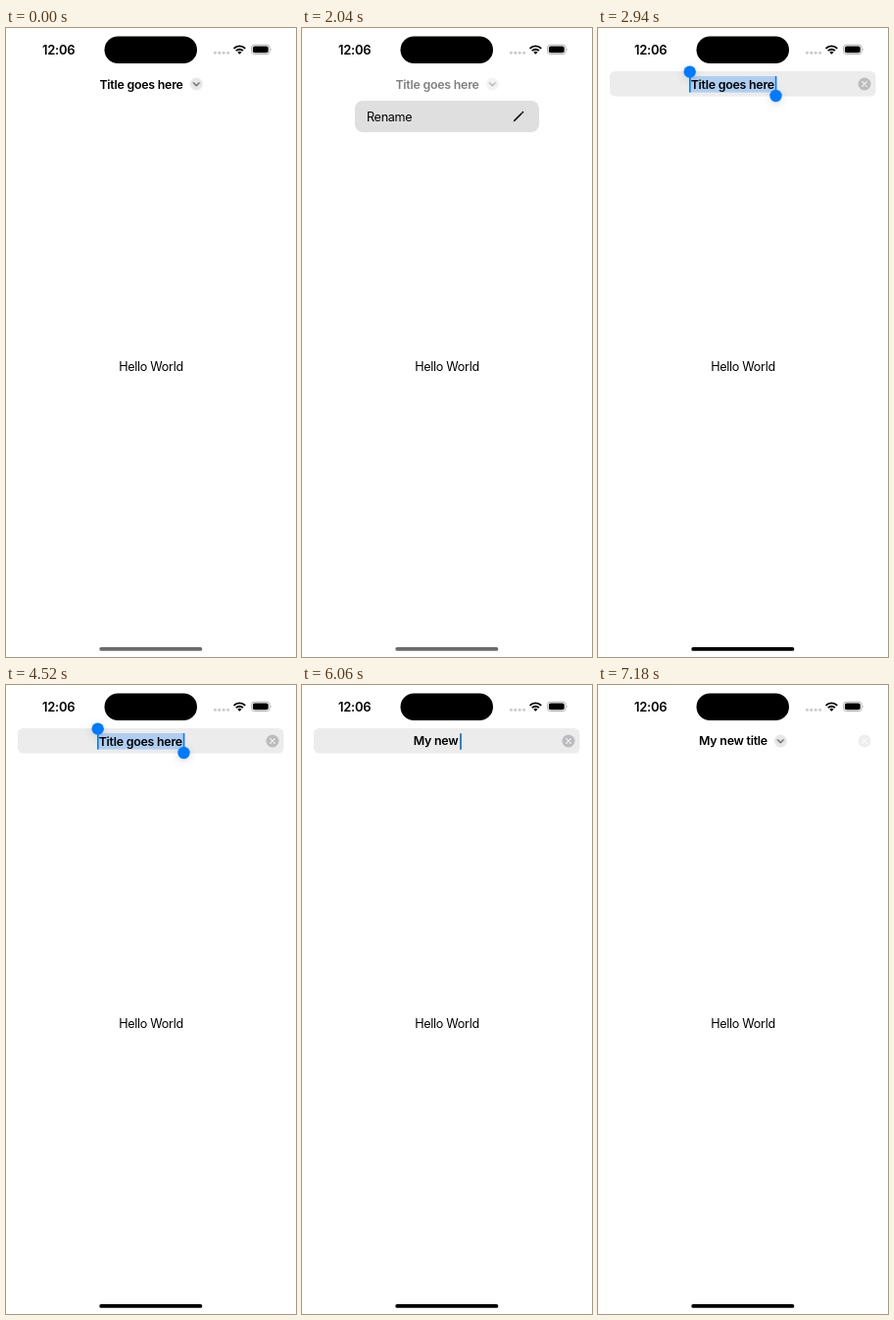
Recreate the animation shown at these times as an HTML page. Size 296x640 px, loop 8000 ms.

```html
<!DOCTYPE html>
<html lang="en">
<head>
<meta charset="utf-8">
<title>Rename title</title>
<style>
html, body { margin: 0; width: 100%; height: 100%; overflow: hidden; background: #fff; }
body { position: relative; font-family: Inter, Roboto, sans-serif; color: #000; }
svg { position: absolute; left: 0; top: 0; display: block; }
text, .menu { font-size: 12.6px; letter-spacing: -.024em; }
.bold { font-weight: 600; font-size: 12.4px; letter-spacing: -.02em; }

/* every timed part shares one stepped 8 s loop */
.menu, .menu i, .title, .chev, .chev2, .field, .select, .stray, .clear, .typed, .caret, .home {
  animation: 8s step-end infinite;
}

.menu {
  position: absolute; left: 54px; top: 74px; width: 188px; height: 32px;
  transform-origin: 50% -17px; animation-name: menu;
}
.menu i {
  position: absolute; inset: 0; border-radius: 8px; animation-name: panel;
}
.menu span { position: absolute; left: 12px; top: 0; line-height: 33px; }
.menu svg { left: 161px; top: 10px; }
@keyframes menu {
  0%      { opacity: 0; transform: scale(.2); }
  6.25%   { opacity: .2; transform: scale(.35); }
  7.625%  { opacity: .6; transform: scale(.7); }
  9%      { opacity: .9; transform: scale(.95); }
  10.375% { opacity: 1; transform: scale(1.02); }
  11.875% { opacity: 1; transform: none; }
  26.875% { opacity: .65; transform: scale(.85); }
  28.25%  { opacity: .2; transform: scale(.45); }
  29.625%, 100% { opacity: 0; transform: scale(.2); }
}
@keyframes panel {
  0%    { background: #f1f1f1; box-shadow: 0 4px 44px 12px rgba(0, 0, 0, .15); }
  25.5%, 100% { background: #dfdfdf; box-shadow: none; }
}

.title { animation-name: title; }
@keyframes title {
  0%      { opacity: 1; transform: none; }
  6.25%   { opacity: .5; transform: none; }
  28.25%  { opacity: .75; transform: none; }
  29.625% { opacity: 1; transform: translateX(-.7px); }
  58.25%, 100% { opacity: 0; }
}

.chev { animation-name: chev; }
@keyframes chev {
  0% { opacity: 1; }
  6.25% { opacity: .5; }
  28.25%, 100% { opacity: 0; }
}
.chev2 { animation-name: chev2; }
@keyframes chev2 {
  0% { opacity: 0; }
  88.25% { opacity: .4; }
  89.75%, 100% { opacity: 1; }
}

.field { animation-name: field; }
@keyframes field {
  0% { opacity: 0; }
  28.25% { opacity: .5; }
  29.625% { opacity: 1; }
  88.25% { opacity: .5; }
  89.75%, 100% { opacity: 0; }
}
.clear { animation-name: clear; }
@keyframes clear {
  0% { opacity: 0; }
  36.75% { opacity: 1; }
  88.25% { opacity: .6; }
  89.75%, 100% { opacity: .25; }
}

.stray { animation-name: stray; }
@keyframes stray {
  0%, 32.5%, 100% { visibility: hidden; }
  29.625% { visibility: visible; }
}
.select { animation-name: select; }
@keyframes select {
  0%, 58.25%, 100% { visibility: hidden; }
  32.5% { visibility: visible; }
}
.knob { fill: #007aff; filter: drop-shadow(0 2px 4px rgba(0, 0, 0, .14)); }

.home { animation-name: home; }
@keyframes home {
  0% { fill: #6a6a6a; }
  32.5%, 100% { fill: #000; }
}

.typed {
  position: absolute; left: 38px; top: 45px; width: 200px; height: 24px;
  font: 600 0/24px Inter, Roboto, sans-serif; text-align: center; white-space: pre;
  animation-name: typed;
}
@keyframes typed {
  0% { visibility: hidden; }
  58.25%, 100% { visibility: visible; }
}
.typed b {
  font-weight: 600; font-size: 0; letter-spacing: -.02em;
  animation: key 8s var(--at) step-end infinite;
}
@keyframes key {
  0% { font-size: 12.4px; }
  50%, 100% { font-size: 0; }
}
.caret {
  display: inline-block; width: 2px; height: 17px; margin: 4px -1px 0; border-radius: 1px;
  background: #2f7fd6; vertical-align: top; animation-name: caret;
}
@keyframes caret {
  0% { opacity: 1; }
  88.25% { opacity: .4; }
  89.75%, 100% { opacity: 0; }
}
</style>
</head>
<body>
<div class="menu">
  <i></i><span>Rename</span>
  <svg width="12" height="12" fill="none" stroke="#000" stroke-linecap="round">
    <path d="M1.8 10.2L8.8 3.2" stroke-width="1.6"/>
    <path d="M10 2L10.4 1.6" stroke-width="1.7"/>
    <path d="M1.1 10.9L2 10" stroke-width=".8"/>
  </svg>
</div>

<svg width="296" height="640" viewBox="0 0 296 640">
  <defs>
    <g id="chevron">
      <circle r="6.5" fill="#e7e7e8"/>
      <path d="M-2.9 -1.2L0 1.7L2.9 -1.2" fill="none" stroke="#68686b" stroke-width="1.3" stroke-linecap="round" stroke-linejoin="round"/>
    </g>
    <clipPath id="corner"><rect x="17" y="45" width="50" height="25"/></clipPath>
  </defs>

  <!-- status bar -->
  <text class="bold" x="53.7" y="26.6" text-anchor="middle" style="font-size:13px">12:06</text>
  <rect x="100.5" y="8.5" width="94.5" height="27.5" rx="13.75"/>
  <g fill="#cacaca">
    <circle cx="213.4" cy="25.2" r="1.5"/><circle cx="217.8" cy="25.2" r="1.5"/>
    <circle cx="222.2" cy="25.2" r="1.5"/><circle cx="226.6" cy="25.2" r="1.5"/>
  </g>
  <g fill="none" stroke="#000" stroke-width="1.9">
    <path d="M232.6 20.8a8.2 8.2 0 0 1 11.6 0"/>
    <path d="M234.9 23.2a4.9 4.9 0 0 1 7 0"/>
  </g>
  <path d="M238.4 26.8L236.3 24.7a3 3 0 0 1 4.2 0z"/>
  <rect x="250.5" y="17.2" width="18.6" height="9.4" rx="3" fill="none" stroke="#a8a8a8" stroke-width=".9"/>
  <rect x="251.9" y="18.6" width="15.8" height="6.6" rx="1.8"/>
  <path d="M270.1 20.4q1.4 1.5 0 3z" fill="#a8a8a8"/>

  <!-- edit field -->
  <rect class="field" x="12" y="44" width="271.5" height="25.5" rx="5.5" fill="#ececec"/>
  <g class="clear">
    <circle cx="272" cy="57" r="6.5" fill="#bcbcbe"/>
    <path d="M269.7 54.7l4.6 4.6m0 -4.6l-4.6 4.6" stroke="#f4f4f4" stroke-width="1.2" stroke-linecap="round"/>
  </g>
  <rect class="select" x="93" y="49" width="89" height="16.5" fill="#007aff" fill-opacity=".26"/>

  <text class="bold title" x="138" y="61.5" text-anchor="middle">Title goes here</text>
  <use class="chev" href="#chevron" x="194.3" y="57"/>
  <use class="chev2" href="#chevron" x="186.3" y="57"/>

  <g class="stray" clip-path="url(#corner)">
    <circle class="knob" cx="17" cy="42" r="6.2"/>
    <circle class="knob" cx="37.8" cy="49.2" r="6.2"/>
  </g>
  <g class="select">
    <path d="M93.8 48V65.5M181.6 49V66" stroke="#007aff" stroke-width="1.6"/>
    <circle class="knob" cx="93.7" cy="44.6" r="6.2"/>
    <circle class="knob" cx="181.5" cy="69" r="6.2"/>
  </g>

  <text x="148" y="348.6" text-anchor="middle">Hello World</text>
  <rect class="home" x="95.3" y="630" width="105" height="3.8" rx="1.9"/>
</svg>

<div class="typed"><b style="--at:4.66s">M</b><b style="--at:5.17s">y</b><b style="--at:5.28s"> n</b><b style="--at:5.43s">e</b><b style="--at:5.59s">w</b><b style="--at:6.06s"> </b><b style="--at:6.17s">t</b><b style="--at:6.28s">i</b><b style="--at:6.39s">t</b><b style="--at:6.5s">le</b><span class="caret"></span></div>
</body>
</html>
```
